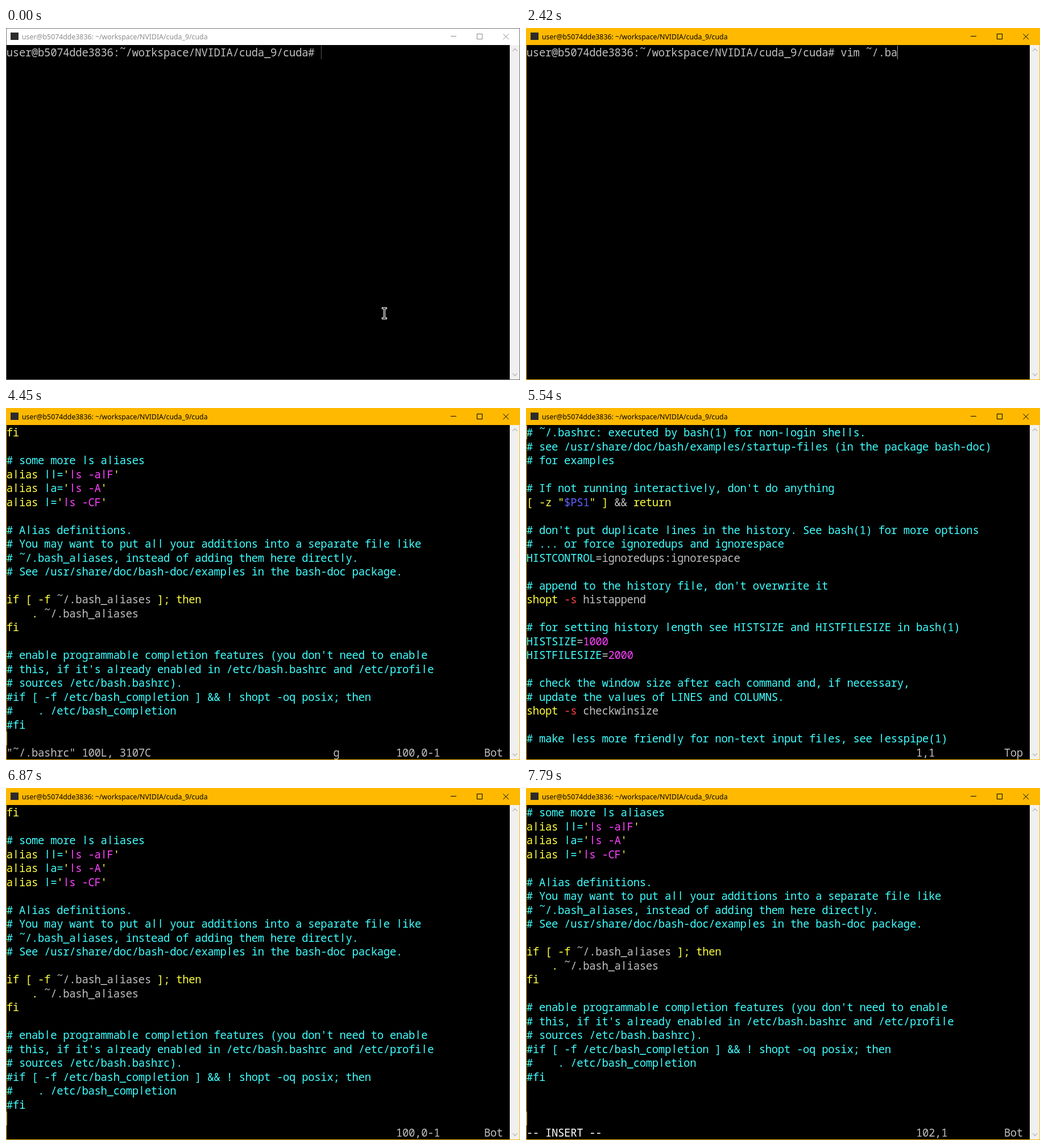
These frames come from a looping animation (904x620 px, 8000 ms). An HTML page with a canvas:

```html
<!DOCTYPE html>
<html lang="en">
<head>
<meta charset="utf-8">
<title>Terminal</title>
<style>
  html, body { margin: 0; width: 100%; height: 100%; overflow: hidden; background: #000; }
  canvas { display: block; }
</style>
</head>
<body>
<canvas width="904" height="620"></canvas>
<script>
const ctx = document.querySelector('canvas').getContext('2d');
const LOOP = 8000, CELL = 11.05, ROW = 24.5, LEFT = 1, TOP = 31;
const MONO = '500 19px "Noto Sans Mono", "DejaVu Sans Mono", monospace';
const SANS = '500 19px "Noto Sans", sans-serif';
const HOST = 'user@b5074dde3836', PATH = '~/workspace/NVIDIA/cuda_9/cuda';
const PROMPT = `${HOST}:${PATH}# `, COMMAND = 'vim ~/.bashrc ';
const COLORS = {
  n: '#bfbfbf', c: '#40ffff', y: '#ffff40', m: '#ff40ff', r: '#ff4040', b: '#6060ff', w: '#ffffff'
};

// Moments at which each command character appears; completion adds the last two together.
const KEYS = [630, 700, 850, 940, 1180, 1320, 1640, 2250, 2420, 2890, 2970, 3130, 3210, 3210];

// "|x" switches to colour x; lines starting with # are comments.
const HEAD = `# ~/.bashrc: executed by bash(1) for non-login shells.
# see /usr/share/doc/bash/examples/startup-files (in the package bash-doc)
# for examples

# If not running interactively, don't do anything
|y[ -z "|b$PS1|y" ] |n&& |yreturn

# don't put duplicate lines in the history. See bash(1) for more options
# ... or force ignoredups and ignorespace
|cHISTCONTROL|n=ignoredups:ignorespace

# append to the history file, don't overwrite it
|yshopt |r-s |nhistappend

# for setting history length see HISTSIZE and HISTFILESIZE in bash(1)
|cHISTSIZE|n=|m1000
|cHISTFILESIZE|n=|m2000

# check the window size after each command and, if necessary,
# update the values of LINES and COLUMNS.
|yshopt |r-s |ncheckwinsize

# make less more friendly for non-text input files, see lesspipe(1)`.split('\n');

const TAIL = `|yfi

# some more ls aliases
|yalias |cll=|y'|mls -alF|y'
|yalias |cla=|y'|mls -A|y'
|yalias |cl=|y'|mls -CF|y'

# Alias definitions.
# You may want to put all your additions into a separate file like
# ~/.bash_aliases, instead of adding them here directly.
# See /usr/share/doc/bash-doc/examples in the bash-doc package.

|yif [ -f |n~/.bash_aliases |y]; then
    |y. |n~/.bash_aliases
|yfi

# enable programmable completion features (you don't need to enable
# this, if it's already enabled in /etc/bash.bashrc and /etc/profile
# sources /etc/bash.bashrc).
#if [ -f /etc/bash_completion ] && ! shopt -oq posix; then
#    . /etc/bash_completion
#fi`.split('\n');

function rect(color, x, y, w, h) {
  ctx.fillStyle = color;
  ctx.fillRect(x, y, w, h);
}

function line(color, width, ...points) {
  ctx.strokeStyle = color;
  ctx.lineWidth = width;
  ctx.beginPath();
  for (let i = 0; i < points.length; i += 2) ctx.lineTo(points[i], points[i + 1]);
  ctx.stroke();
}

// The terminal face has a plain bar for "l" and a raised tilde.
function print(text, row, col = 0) {
  ctx.textAlign = 'center';
  ctx.fillStyle = text[0] === '#' ? COLORS.c : COLORS.n;
  for (let i = 0; i < text.length; i++) {
    if (text[i] === '|') {
      ctx.fillStyle = COLORS[text[++i]];
      continue;
    }
    const lift = text[i] === '~' ? 7 : 0;
    ctx.font = text[i] === 'l' ? SANS : MONO;
    ctx.fillText(text[i], LEFT + (col++ + 0.5) * CELL, TOP + row * ROW + 19 - lift);
  }
}

function caret(row, col = 0, color = '#a0a0a0') {
  rect(color, Math.round(LEFT + col * CELL), Math.round(TOP + row * ROW), 1, 24);
}

function drawWindow(active) {
  const ink = active ? '#000' : '#8c8c8c';
  const frame = active ? '#ffb900' : '#777';
  rect('#000', 0, 0, 904, 620);
  rect(active ? '#ffb900' : '#fff', 0, 0, 904, 30);
  rect('#f0f0f0', 886, 30, 17, 589);
  line('#b8b8b8', 1.3, 891, 40.5, 895, 36.5, 899, 40.5);
  line('#b8b8b8', 1.3, 891, 608.5, 895, 612.5, 899, 608.5);
  ctx.strokeStyle = frame;
  ctx.lineWidth = 1;
  ctx.strokeRect(0.5, 0.5, 903, 619);

  rect('#2b2b2b', 8, 8, 14, 13);
  ctx.font = '12.3px "Noto Sans", "Open Sans", sans-serif';
  ctx.textAlign = 'left';
  ctx.fillStyle = ink;
  ctx.fillText(`${HOST}: ${PATH}`, 28, 20);

  line(ink, 1, 782, 14.5, 792, 14.5);
  ctx.strokeRect(828.5, 10.5, 9, 9);
  line(ink, 1, 874.5, 10.5, 884, 20);
  line(ink, 1, 884, 10.5, 874.5, 20);
}

function drawPointer(x, y) {
  for (const [color, width] of [['#fff', 3.4], ['#000', 1.2]]) {
    const end = width / 2 - 0.6;
    line(color, width, x, y - 9, x, y + 9);
    for (const side of [-9, 9]) line(color, width, x - 3.5 - end, y + side, x + 3.5 + end, y + side);
  }
}

function drawShell(t) {
  const typed = KEYS.filter(key => t >= key).length;
  print(PROMPT + COMMAND.slice(0, typed), 0);
  if (t >= 3510) caret(1);
  else caret(0, PROMPT.length + typed, t < 70 ? '#555' : undefined);
  if (t < 70) drawPointer(665.5, 502.5);
  else if (t < 150) drawPointer(645.5, 487.5);
  else if (t < 630) drawPointer(624.5, 472.5);
}

function drawEditor(t) {
  const atTop = t >= 5540 && t < 6870;
  const added = (t >= 7650) + (t >= 7790);
  const lines = atTop ? HEAD : TAIL.slice(added);
  lines.forEach((text, row) => print(text, row));

  const escaping = t >= 6410 && t < 6480;
  if (!escaping) caret(atTop ? +(t >= 5850) : 22);

  if (t < 5540) print('"~/.bashrc" 100L, 3107C', 23);
  if (added) print('|w-- INSERT --', 23);
  if (t >= 4450 && t < 5540) print('g', 23, 52);
  if (escaping) print('^[', 23, 52);

  const position = atTop ? (t < 5850 ? '1,1' : '2,1') : added ? `${100 + added},1` : '100,0-1';
  print(position, 23, 62);
  print(atTop ? 'Top' : 'Bot', 23, 76);
}

function draw(now) {
  const t = now % LOOP;
  drawWindow(t >= 70);
  (t < 3590 ? drawShell : drawEditor)(t);
}

const start = performance.now();
function tick() {
  draw(performance.now() - start);
  requestAnimationFrame(tick);
}
tick();
</script>
</body>
</html>
```
